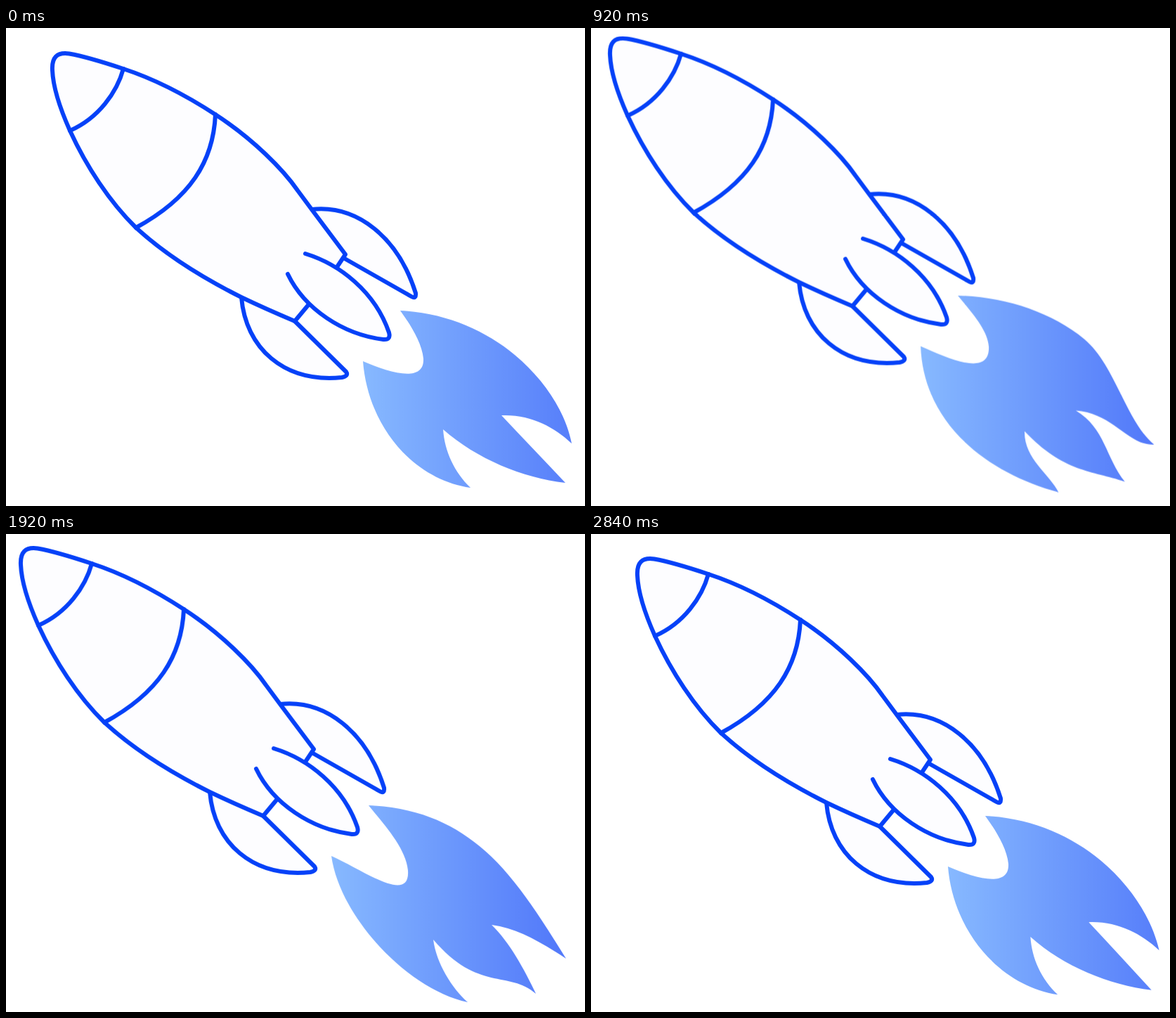
Animation, 824 px wide and 680 px high, one loop 2880 ms. Source, as an HTML page:

```html
<!DOCTYPE html>
<html lang="en">
<head>
<meta charset="utf-8">
<title>Rocket</title>
<style>
html, body { margin: 0; width: 100%; height: 100%; overflow: hidden; background: #fff; }
svg { display: block; width: 100%; height: 100%; }
.ship { animation: fly 2880ms linear infinite; }
.flame { fill: url(#heat); animation: burn 2880ms linear infinite; }
.hull { fill: #fdfdff; stroke: #0541f8; stroke-width: 6; stroke-linecap: round; stroke-linejoin: round; }
.line { fill: none; }

@keyframes fly {
  0%, 100% { transform: translate(0, 0); }
  6.94% { transform: translate(-8.6px, 3px); }
  13.89% { transform: translate(-17px, -1px); }
  19.44% { transform: translate(-24px, -7.5px); }
  22.22% { transform: translate(-27.5px, -10.5px); }
  38.89% { transform: translate(-47px, -29px); }
  41.67% { transform: translate(-50px, -32px); }
  43.4% { transform: translate(-52px, -33px); }
  54.17% { transform: translate(-63.5px, -22.5px); }
  55.56% { transform: translate(-62px, -21px); }
  58.33% { transform: translate(-58px, -18px); }
  66.67% { transform: translate(-45px, -16px); }
  77.78% { transform: translate(-27px, -14.5px); }
  87.5% { transform: translate(-13px, -10px); }
  97.22% { transform: translate(-.5px, -3px); }
  98.61% { transform: translate(0, -1px); }
}

/* Outline order: shoulder, right tongue, middle tongue, left tongue, notch behind the fin */
@keyframes burn {
  0%, 100% { d: path("M561 402 C625 405 682 430 724 465 C767 501 796 546 805 591 C780 567 745 549 705 551 C735 583 766 615 796 647 C735 640 670 613 622 571 C624 602 638 632 661 654 C578 642 515 565 508 474 C545 490 596 506 594 470 C592 448 575 421 561 402 Z"); }
  18.75%, 22.22% { d: path("M561 402 C628 404 690 430 732 465 C770 497 800 581 839.5 609 C812 607 785 595 753 584 C792 608 812 650 830.5 687.5 C793 656 740 678 670 605 C672 636 690 667 709.5 687.5 C608 651 514 565 508 474 C545 490 602 513 600 474 C598 450 576 424 561 402 Z"); }
  41.67% { d: path("M561 402 C625 403 698 420 750 463 C800 505 800 580 841 619 C795 624 778 543 705 547 C750 574 730 614 767 646 C710 645 684 630 642 585 C638 632 693 645 699 676 C595 657 510 602 508 474 C548 492 612 525 610 475 C609 450 580 422 561 402 Z"); }
  55.56% { d: path("M561 402 C621 402 686 429 739 468 C791 508 830 560 840 608 C810 578 759 553 713 556 C737 581 754 611 770 643 C727 627 679 628 630 577 C634 616 654 653 682 681 C602 667 522 566 508 474 C545 492 606 524 603 480 C603 458 578 424 561 402 Z"); }
  66.67% { d: path("M561 402 C633 405 684 429 727 467 C770 505 804 559 842 620 C805 596 773 577 736 572 C761 596 783 636 799 670 C760 636 717 668 653 593 C657 626 680 663 702 682 C617 664 520 561 508 474 C553 494 621 544 617 494 C614 462 580 426 561 402 Z"); }
  77.78% { d: path("M561 402 C632 404 695 432 739 466 C772 492 792 589 840.5 608.5 C810 609 787 599 760 588 C795 609 822 654 839 689.5 C797 654 747 686 676 608 C678 644 694 671 714 690.5 C622 664 522 559 508 474 C545 490 596 506 594 471 C592 448 575 421 561 402 Z"); }
  86.81% { d: path("M561 402 C633 404 690 430 736 468 C781 507 815 558 840 612 C808 588 775 572 738 572 C766 602 790 640 812 675 C756 660 700 648 655 600 C656 630 668 657 692 676 C600 655 518 563 508 474 C545 490 596 506 594 470 C592 448 575 421 561 402 Z"); }
}
</style>
</head>
<body>
<svg viewBox="0 0 824 680">
  <defs>
    <linearGradient id="heat" gradientUnits="userSpaceOnUse" x1="508" y1="0" x2="830" y2="0">
      <stop offset="0" stop-color="#87b9ff"/>
      <stop offset="1" stop-color="#537afa"/>
    </linearGradient>
  </defs>
  <g class="ship">
    <path class="flame"/>
    <g class="hull">
      <!-- side fins -->
      <path d="M435 258C500 251 558 298 583 377Q584 386 577 382L482 328"/>
      <path d="M335 383C341 455 395 505 478 497Q488 495 484 489L411 417"/>
      <!-- body -->
      <path d="M411 417C385 406 360 395 335 383C275 353 222 318 185 284C147 247 114 196 91 146C78 117 67 85 66 60C65 42 72 34 90 36.5C110 40 140 49 167 58C210 72 255 95 298 123C352 158 395 202 415 231L435 258L483 322L471 340L431 393Z" stroke="none"/>
      <path class="line" d="M411 417C385 406 360 395 335 383C275 353 222 318 185 284C147 247 114 196 91 146C78 117 67 85 66 60C65 42 72 34 90 36.5C110 40 140 49 167 58C210 72 255 95 298 123C352 158 395 202 415 231L435 258L483 322L471 340M411 417L431 393"/>
      <path class="line" d="M167 58C158 91 132 128 91 146M298 123C295 190 262 242 185 284"/>
      <!-- middle fin -->
      <path d="M426 321C475 336 525 375 545 433Q548 444 537 443C480 436 425 400 401 350"/>
    </g>
  </g>
</svg>
</body>
</html>
```
